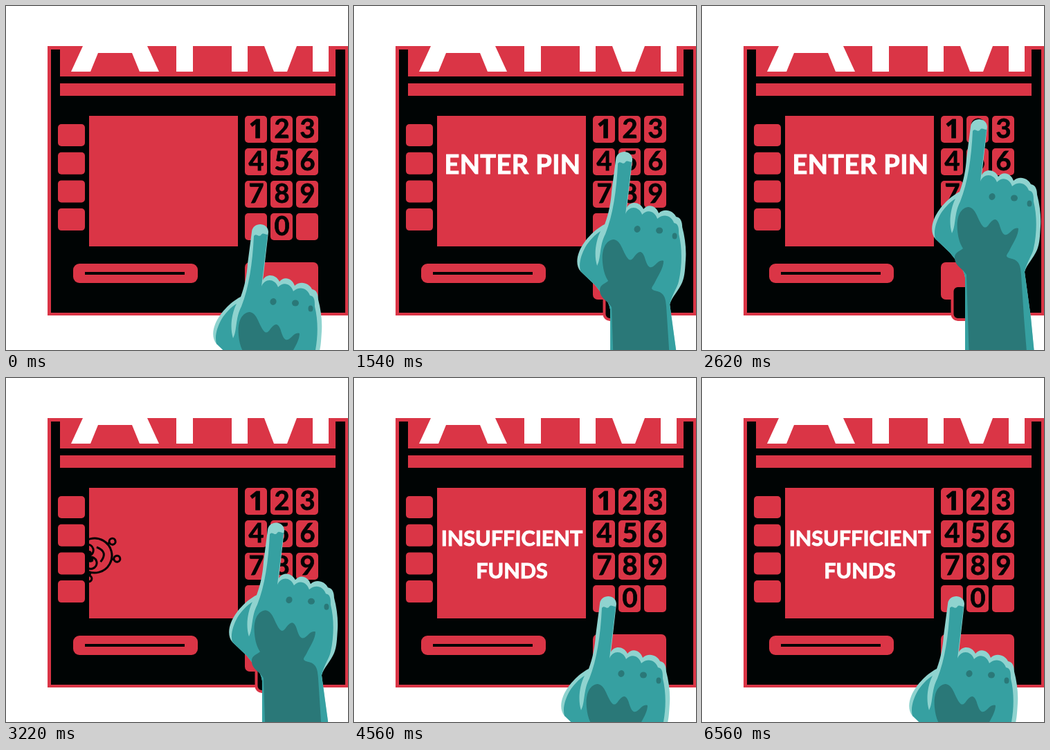
An HTML page for the animation above (7060 ms loop, 494x498 px).

```html
<!DOCTYPE html>
<html lang="en">
<head>
<meta charset="utf-8">
<title>Cash machine</title>
<style>
  html, body { margin: 0; width: 100%; height: 100%; overflow: hidden; background: #fff; }
  svg { display: block; width: 100%; height: 100%; }
  text { font: 700 38px Lato, sans-serif; text-anchor: middle; }
  .red { fill: #da3546; }
  .black { fill: #000404; }
  .white { fill: #fff; }
  .teal { fill: #36a0a1; }
  .light { fill: #8fd3cf; }
  .dark { fill: #2a7878; }
  .one { font-family: "Open Sans", sans-serif; }
  .message { fill: #fff; stroke: #fff; stroke-width: 1; }
  #keys text { stroke: #000404; stroke-width: .8; }
  #prompt { letter-spacing: .4px; }
  #refusal text { font-size: 30.6px; }
  #roller { fill: none; stroke: #000404; stroke-width: 3; }
</style>
</head>
<body>
<svg viewBox="0 0 494 498">
  <clipPath id="screen"><rect x="120" y="159" width="215" height="189"/></clipPath>

  <g id="machine">
    <rect class="red" x="60" y="58" width="434" height="390"/>
    <rect class="black" x="65" y="63" width="425" height="381"/>
    <rect class="red" x="78" y="58" width="398" height="44"/>
    <g class="white">
      <path d="M94 95L111 58H204L221 95H193L182 68H133L122 95Z"/>
      <path d="M246 58H270V95H246Z"/>
      <path d="M326 58H349V95H326ZM443 58H466V95H443ZM373 58H420L406 95H387Z"/>
    </g>
    <rect class="red" x="78" y="112" width="398" height="18"/>
    <rect class="red" x="120" y="159" width="215" height="189"/>
    <rect class="red" x="97" y="373" width="180" height="28" rx="9"/>
    <rect class="black" x="114" y="385" width="144" height="4"/>
    <rect class="red" x="345" y="371" width="106" height="54" rx="7"/>
    <rect class="black" x="361.5" y="405" width="74" height="49" rx="8" stroke="#da3546" stroke-width="4"/>
  </g>
  <g id="keys"></g>

  <text id="prompt" class="message" x="229" y="243">ENTER PIN</text>
  <g id="refusal" class="message">
    <text x="228" y="243">INSUFFICIENT</text>
    <text x="228" y="290">FUNDS</text>
  </g>

  <g clip-path="url(#screen)">
    <g id="roller">
      <circle r="25"/>
      <circle cx="-9" cy="-8" r="8.5"/>
      <circle cx="10" cy="-8" r="8.5"/>
      <circle class="black" cx="-4" cy="-7" r="2.5"/>
      <circle class="black" cx="5" cy="-7" r="2.5"/>
      <path d="M-11 6Q0 21 11 6M-22 -12L-27 -15M22 -12L26 -13M-11 22L-13 26M11 22L13 26"/>
      <circle cx="-30" cy="-17" r="4.5"/>
      <circle cx="30" cy="-14" r="4.5"/>
      <circle cx="-13" cy="30" r="4.5"/>
      <circle cx="13" cy="30" r="4.5"/>
    </g>
  </g>

  <g id="hand">
    <path class="light" d="M388 222C389 208 411 207 412 222L404 292C408 283 422 282 428 294C434 286 446 288 450 300C458 292 471 296 475 305
      C482 306 484 313 484 320C488 335 490 352 489 366C488 380 488 390 484 400C479 412 469 421 466 432L475 498L481 560H380V440
      C378 425 366 415 358 404L337 384C331 377 331 366 335 356C341 341 356 324 372 316C378 300 381 284 382 268Z"/>
    <path class="teal" d="M391 228C394 223 398 230 401 227C404 222 407 226 411 226L402 301C407 289 421 289 426 302C433 294 444 296 448 308
      C457 300 468 303 472 314C479 315 479 322 479 330C484 350 484 375 479 398C477 408 470 415 466 432L475 498L481 560H380V440
      C378 425 366 415 358 404L337 384C334 373 338 360 344 349C350 339 358 331 366 326C359 340 356 360 361 376
      C367 365 364 347 373 330C384 302 389 268 391 228Z"/>
    <path class="dark" d="M369 372C367 353 373 339 385 338C396 340 397 354 405 365C412 374 415 357 423 356C431 357 430 374 437 378
      C445 380 448 366 457 369C457 380 449 390 444 401C441 407 435 410 448 413C459 416 460 424 461 436L465 498L470 560H386L382 436
      C377 427 366 424 365 413C364 403 373 402 377 398C372 390 370 382 369 372Z"/>
    <ellipse class="dark" cx="419" cy="323" rx="4.5" ry="5" transform="rotate(25 419 323)"/>
    <ellipse class="dark" cx="451" cy="325" rx="5" ry="4.5"/>
    <ellipse class="dark" cx="473" cy="333" rx="3.5" ry="4.5"/>
  </g>
</svg>
<script>
const LOOP = 7060, MOVE_START = 700, STEP = 120;
const byId = id => document.getElementById(id);
const show = (id, on) => byId(id).setAttribute('visibility', on ? 'visible' : 'hidden');
const ease = u => u * u * (3 - 2 * u);

// Hand offsets from the "5" key: [step, x, y]
const handPath = [
  [-1, -33, 105], [2, 0, 0], [3, 1, -6], [5, 0, 0],
  [11, -38, 0], [16, 0, -47], [17, 1, -53], [27.5, -33, 105]
];

function handAt(step) {
  const next = handPath.findIndex(key => key[0] > step);
  if (next < 0) return handPath.at(-1).slice(1);
  if (next === 0) return handPath[0].slice(1);
  const from = handPath[next - 1], to = handPath[next];
  const u = ease((step - from[0]) / (to[0] - from[0]));
  return [1, 2].map(i => from[i] + (to[i] - from[i]) * u);
}

function buildKeys() {
  const button = (x, y, w, h) =>
    `<rect class="red" x="${x}" y="${y}" width="${w}" height="${h}" rx="5"/>`;
  let markup = '';
  for (let row = 0; row < 4; row++) {
    markup += button(75, 171 + row * 40.7, 39, 32);
    for (let col = 0; col < 3; col++) {
      const x = 345 + col * 37, y = 159 + row * 47;
      const label = row < 3 ? row * 3 + col + 1 : ['', 0, ''][col];
      markup += button(x, y, 32, 39) +
        `<text class="black${label === 1 ? ' one' : ''}" x="${x + 16.5}" y="${y + 31.8}">${label}</text>`;
    }
  }
  byId('keys').innerHTML = markup;
}

function draw(t) {
  const step = Math.floor((t - MOVE_START) / STEP);
  show('prompt', t >= 200 && step < 18);
  show('refusal', t >= 4560 && Math.floor((t - 4560) / 500) % 2 === 0);
  show('roller', step >= 20 && step < 28);
  const rolled = step - 26;
  byId('roller').setAttribute('transform',
    `translate(${298 + 34 * rolled} 257) rotate(${75 * rolled - 90})`);
  byId('hand').setAttribute('transform', `translate(${handAt(step)})`);
}

function tick() {
  draw(performance.now() % LOOP);
  requestAnimationFrame(tick);
}

buildKeys();
tick();
</script>
</body>
</html>
```
